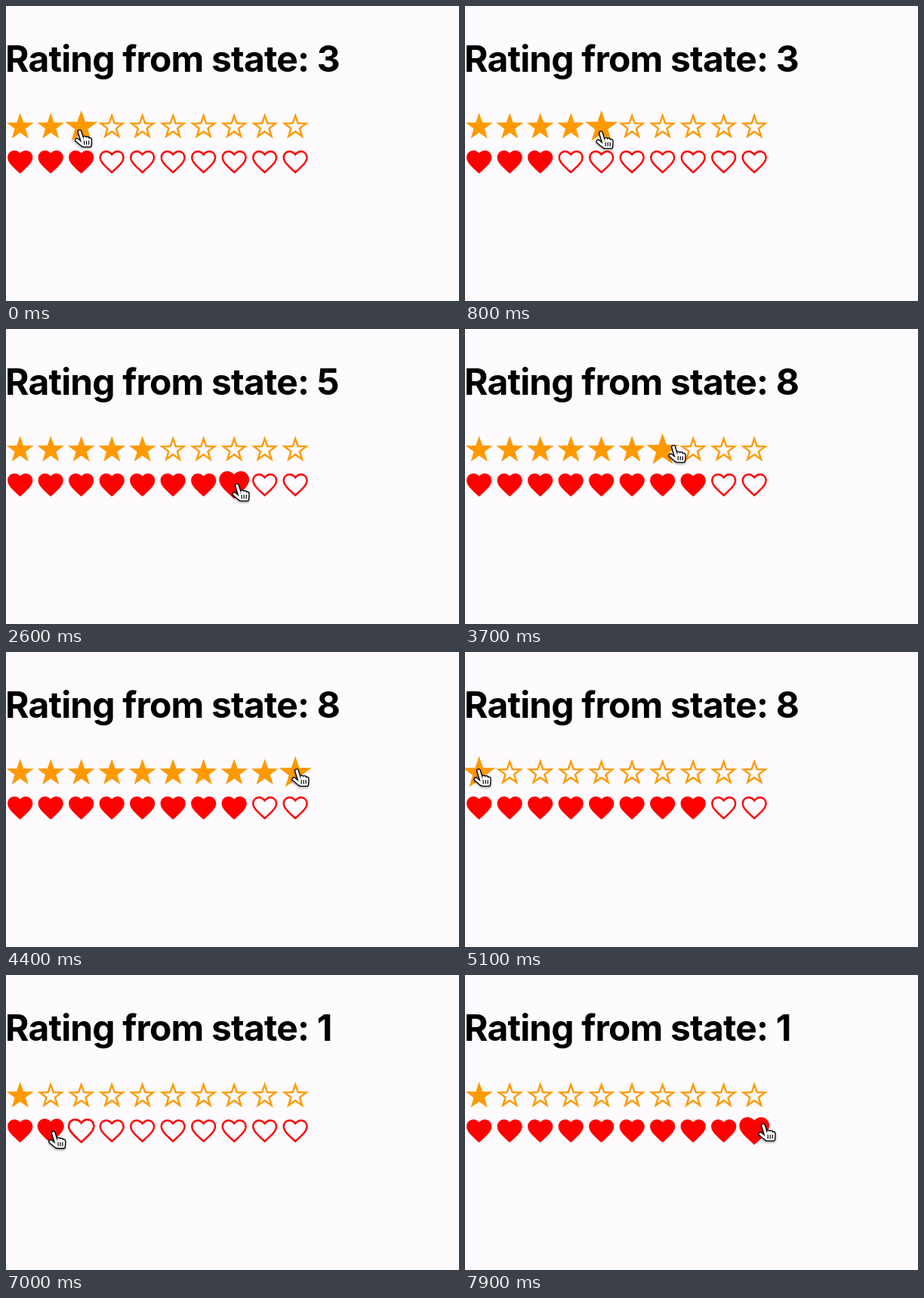
These frames come from a looping animation (600x390 px, 8000 ms). An HTML page with a canvas:

```html
<!DOCTYPE html>
<html>
<head>
<meta charset="utf-8">
<style>
  html, body { margin: 0; width: 600px; height: 390px; overflow: hidden; background: #fdfbfe; }
  h1 { position: absolute; left: -1px; top: 46px; margin: 0; white-space: nowrap; color: #000;
       font: 700 48px/48px Inter, sans-serif; letter-spacing: -.018em; }
  canvas { position: absolute; left: 0; top: 0; }
</style>
</head>
<body>
<h1>Rating from state: <span id="value">3</span></h1>
<canvas id="stage" width="600" height="390"></canvas>
<script>
const ctx = document.getElementById('stage').getContext('2d');
const value = document.getElementById('value');
const LOOP = 8000, FRAME = 100, FADE = 150, PITCH = 40.5, FIRST = 18.7;

function starPath(radius, drop) {
  const path = new Path2D();
  for (let i = 0; i < 10; i++) {
    const r = i % 2 ? radius * .4 : radius, a = i * Math.PI / 5;
    path.lineTo(r * Math.sin(a), drop - r * Math.cos(a));
  }
  path.closePath();
  return path;
}

const heart = new Path2D('M0 15.5C-9.5 6.8-16.6 1-16.6-5.8-16.6-11-12.6-15-7.5-15-4.5-15-1.8-13.5 0-11.4 1.8-13.5 4.5-15 7.5-15 12.6-15 16.6-11 16.6-5.8 16.6 1 9.5 6.8 0 15.5z');
const hand = new Path2D('M0 0L5 16M6.8 8.5L7.5 14M10.3 9V14M13.6 10.5V15M-3.6 11.3L4 17.5M5 14H13.3V18H6z');
const creases = new Path2D('M6.2 12.5V17M9.2 12.5V17M12.2 12.5V17');

const rows = [
  { y: 158.5, color: '#ff9900', path: starPath(18.8, 1.5) },
  { y: 206, color: '#ff0000', path: heart }
];

// pointer moves: start, end, and the place reached
const home = [97.5, 166];
const moves = [
  [200, 800, 180, 168],
  [1160, 2360, 306, 207],
  [2900, 3500, 276, 156],
  [3800, 4300, 385, 157],
  [4450, 4950, 18, 157],
  [5600, 6650, 250, 370],
  [6650, 7090, 40, 207],
  [7200, 7700, 395, 199]
];
const clicks = [0, 900, 2700, 5500];

// each move eases in and out along an arc that bulges upwards
function pointer(t) {
  let [x, y] = home;
  for (const [start, end, toX, toY] of moves) {
    if (t <= start) break;
    const k = Math.min(1, (t - start) / (end - start));
    const s = k * k * (3 - 2 * k);
    x += (toX - x) * s;
    y += (toY - y) * (toY > y ? s * s : s * (2 - s));
  }
  return [x, y];
}

// row and cell (1 to 10) under the pointer
function hover(t) {
  const [x, y] = pointer(t);
  const row = rows.find(r => Math.abs(y - r.y) < 23.5);
  const cell = Math.floor((x - FIRST) / PITCH + 1.5);
  return { row, cell };
}

const rating = t => hover(clicks.findLast(c => c <= t)).cell;

function drawRow(row, t) {
  const now = hover(t);
  const count = now.row === row ? now.cell : rating(t);
  const recent = Array.from({ length: 10 }, (_, i) => hover(t - i * FADE / 10));
  for (let n = 1; n <= 10; n++) {
    const grow = recent.filter(h => h.row === row && h.cell === n).length / recent.length;
    const scale = 1 + .2 * grow;
    ctx.save();
    ctx.translate(FIRST + (n - 1) * PITCH, row.y);
    ctx.scale(scale, scale);
    ctx.fillStyle = ctx.strokeStyle = row.color;
    if (n <= count) {
      ctx.fill(row.path);
    } else {
      // clipping leaves only the inner half of the line
      ctx.clip(row.path);
      ctx.lineWidth = 4.8;
      ctx.stroke(row.path);
    }
    ctx.restore();
  }
}

function drawHand(t) {
  ctx.save();
  ctx.translate(...pointer(t));
  ctx.lineJoin = ctx.lineCap = 'round';
  const line = (path, color, width) => {
    ctx.strokeStyle = color;
    ctx.lineWidth = width;
    ctx.stroke(path);
  };
  ctx.shadowColor = 'rgba(0,0,0,.4)';
  ctx.shadowBlur = 3;
  ctx.shadowOffsetY = 1.5;
  line(hand, '#000', 6);
  ctx.shadowColor = 'transparent';
  line(hand, '#fff', 3.4);
  ctx.fillStyle = '#fff';
  ctx.fill(hand);
  line(creases, '#000', 1.2);
  ctx.restore();
}

function draw(now) {
  const t = Math.floor(now % LOOP / FRAME) * FRAME;
  ctx.clearRect(0, 0, 600, 390);
  value.textContent = rating(t);
  rows.forEach(row => drawRow(row, t));
  drawHand(t);
  requestAnimationFrame(draw);
}
requestAnimationFrame(draw);
</script>
</body>
</html>
```
